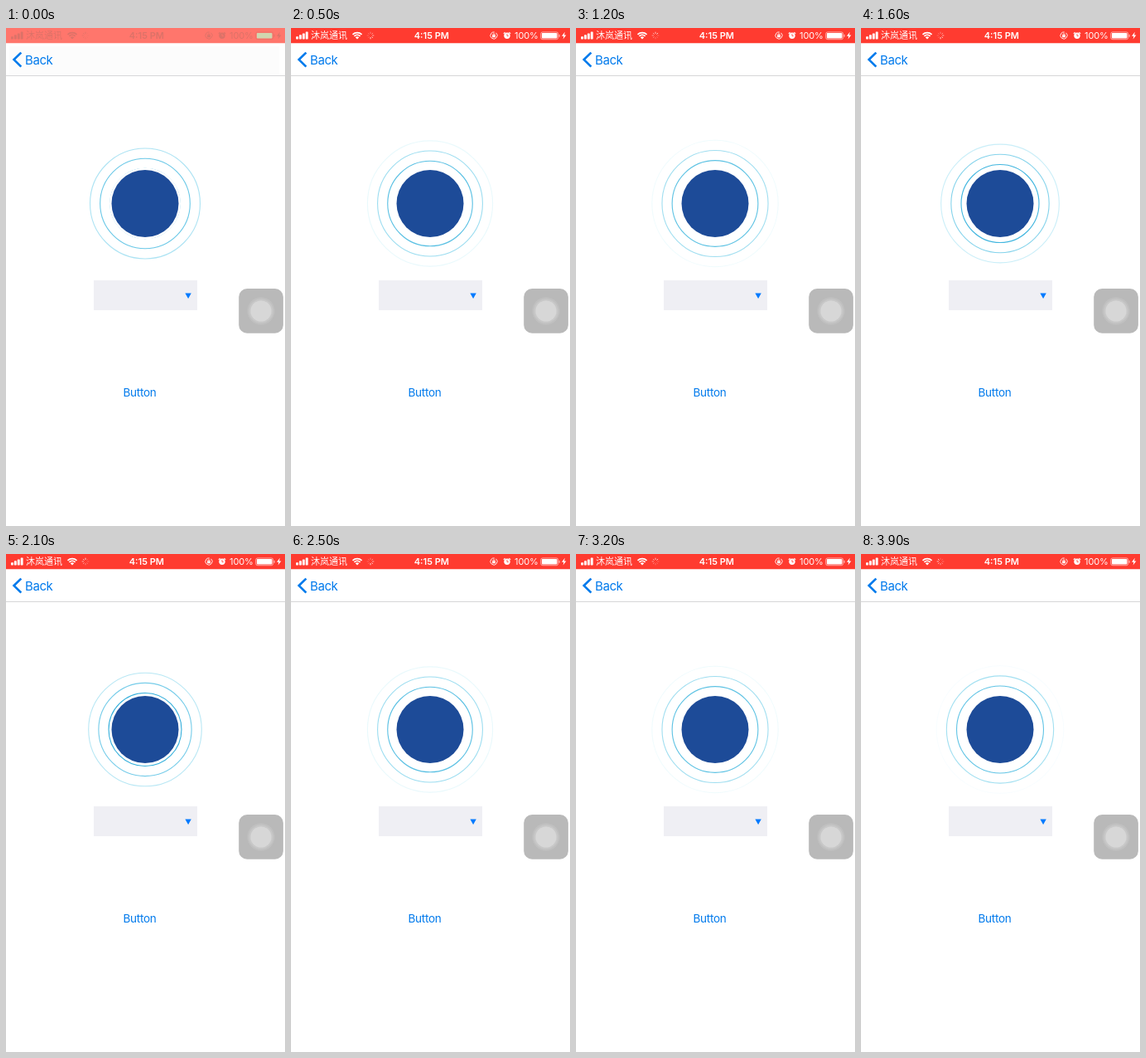
Write an HTML page with a canvas that moves like this. It is 337 px wide and 600 px high and loops after 4 s.

```html
<!DOCTYPE html>
<html lang="en">
<head>
<meta charset="utf-8">
<title>Pulse</title>
<style>
  html, body { margin: 0; width: 100%; height: 100%; overflow: hidden; background: #fff; }
  canvas { display: block; }
</style>
</head>
<body>
<canvas id="stage" width="337" height="600"></canvas>
<script>
const ctx = document.getElementById('stage').getContext('2d');
const TAU = Math.PI * 2;
const BLUE = '#007aec';
const LOOP = 4000, STEP = 100;
const CENTER = { x: 168, y: 211.5 };
const PULSE = { rings: 3, life: 2000, from: 40.5, to: 77, phase: 0.135 };

function fillRect(x, y, w, h, color, radius = 0) {
  ctx.fillStyle = color;
  ctx.beginPath();
  ctx.roundRect(x, y, w, h, radius);
  ctx.fill();
}

function disc(x, y, r, color) {
  ctx.fillStyle = color;
  ctx.beginPath();
  ctx.arc(x, y, r, 0, TAU);
  ctx.fill();
}

function arc(x, y, r, color, width, start = 0, end = TAU) {
  ctx.strokeStyle = color;
  ctx.lineWidth = width;
  ctx.beginPath();
  ctx.arc(x, y, r, start, end);
  ctx.stroke();
}

function trace(points) {
  ctx.beginPath();
  points.forEach(([x, y]) => ctx.lineTo(x, y));
}

function polygon(points, color) {
  trace(points);
  ctx.fillStyle = color;
  ctx.fill();
}

function polyline(points, color, width) {
  trace(points);
  ctx.strokeStyle = color;
  ctx.lineWidth = width;
  ctx.stroke();
}

function label(text, x, y, font, color, align = 'left', spacing = 0) {
  ctx.font = font;
  ctx.fillStyle = color;
  ctx.textAlign = align;
  ctx.letterSpacing = spacing + 'px';
  ctx.fillText(text, x, y);
}

function drawSpinner(t, ink) {
  const spokes = 8;
  const head = Math.floor(t / 1000 * spokes);
  for (let i = 0; i < spokes; i++) {
    const age = (head - i + spokes * LOOP) % spokes;
    const a = i / spokes * TAU - TAU / 4;
    const at = r => [96 + Math.cos(a) * r, 9 + Math.sin(a) * r];
    ctx.globalAlpha = Math.max(0.25, 0.9 - age * 0.12);
    polyline([at(2.1), at(4.3)], ink, 0.9);
  }
  ctx.globalAlpha = 1;
}

function drawWifi(ink) {
  const x = 80, y = 13.6, mid = -TAU / 4, spread = 0.76;
  [8, 5.2].forEach(r => arc(x, y, r, ink, 1.7, mid - spread, mid + spread));
  ctx.fillStyle = ink;
  ctx.beginPath();
  ctx.moveTo(x, y);
  ctx.arc(x, y, 3.2, mid - spread, mid + spread);
  ctx.fill();
}

function drawLockIcon(ink) {
  arc(245, 9, 4.1, ink, 0.9, -0.9, 4.9);
  fillRect(243.1, 8.3, 3.8, 3, ink);
  arc(245, 8.2, 1.3, ink, 0.8, Math.PI, TAU);
}

function drawAlarmIcon(ink, paper) {
  disc(261, 9.3, 3.7, ink);
  polyline([[256.8, 6.9], [258.6, 5.2]], ink, 1.1);
  polyline([[265.2, 6.9], [263.4, 5.2]], ink, 1.1);
  polyline([[261, 6.9], [261, 9.6], [262.8, 9.6]], paper, 0.8);
}

function drawBattery(ink, charge) {
  ctx.globalAlpha = 0.6;
  ctx.strokeStyle = ink;
  ctx.lineWidth = 0.9;
  ctx.beginPath();
  ctx.roundRect(301.7, 4.9, 21, 8.8, 2.2);
  ctx.stroke();
  fillRect(323.6, 7.7, 1.1, 3.2, ink, 0.5);
  ctx.globalAlpha = 1;
  fillRect(302.9, 6.1, 18.6, 6.4, charge, 1);
}

function drawStatusBar(t, faded) {
  const paper = faded ? '#ff766c' : '#ff3b30';
  const ink = faded ? '#dc7268' : '#fff';
  fillRect(0, 0, 337, 18.3, paper);
  for (let i = 0; i < 4; i++) {
    const h = 3.2 + i * 1.9;
    fillRect(6 + i * 3.9, 13.4 - h, 2.9, h, ink, 0.6);
  }
  label('沐岚通讯', 24, 13.4, '11px "Noto Sans CJK SC", "Noto Sans CJK", sans-serif', ink);
  drawWifi(ink);
  drawSpinner(t, ink);
  label('4:15 PM', 169.8, 13, '600 11px Inter, sans-serif', ink, 'center');
  drawLockIcon(ink);
  drawAlarmIcon(ink, paper);
  label('100%', 298.8, 13, '11px Inter, sans-serif', ink, 'right', -0.1);
  drawBattery(ink, faded ? '#d0d6b0' : '#fff');
  polygon([[330.8, 4.8], [327, 9.8], [329.4, 9.8], [328.6, 13.6], [332.4, 8.4], [330, 8.4]], ink);
}

function drawNavBar(faded) {
  if (faded) fillRect(4, 22, 326, 34, '#fcfcfc');
  fillRect(0, 57, 337, 1, '#d6d6d8');
  polyline([[18.3, 29.6], [9.6, 38.1], [18.3, 46.6]], BLUE, 2.7);
  label('Back', 23, 43.6, '15px Inter, sans-serif', BLUE, 'left', -0.4);
}

// Rings leave the disc edge evenly spaced in time and fade as they grow.
function drawPulse(t) {
  for (let i = 0; i < PULSE.rings; i++) {
    const k = (t / PULSE.life + (PULSE.phase + i) / PULSE.rings) % 1;
    const r = PULSE.from + (PULSE.to - PULSE.from) * k;
    const rgb = [30 + 75 * k, 165 + 45 * k, 215 + 20 * k];
    arc(CENTER.x, CENTER.y, r, `rgba(${rgb},${Math.pow(1 - k, 0.6)})`, 1.1);
  }
  disc(CENTER.x, CENTER.y, 43, '#fff');
  disc(CENTER.x, CENTER.y, 40.5, '#1d4b98');
}

function drawControls() {
  fillRect(106, 304, 125, 36, '#efeff4');
  polygon([[216.4, 319.5], [223.8, 319.5], [220.1, 326]], '#007aff');
  label('Button', 161.5, 444, '13.5px Inter, sans-serif', BLUE, 'center', -0.25);
  fillRect(281.2, 314.1, 53.7, 53.7, '#b9b9b9', 10);
  disc(308, 341, 16.6, '#c0c0c0');
  disc(308, 341, 14.6, '#c8c8c8');
  disc(308, 341, 12.6, '#d7d7d7');
}

function draw(t) {
  const faded = t < STEP;
  fillRect(0, 0, 337, 600, '#fff');
  drawStatusBar(t, faded);
  drawNavBar(faded);
  drawPulse(t);
  drawControls();
}

const began = performance.now();
function tick() {
  const t = (performance.now() - began) % LOOP;
  draw(Math.floor(t / STEP) * STEP);
  requestAnimationFrame(tick);
}
tick();
</script>
</body>
</html>
```
